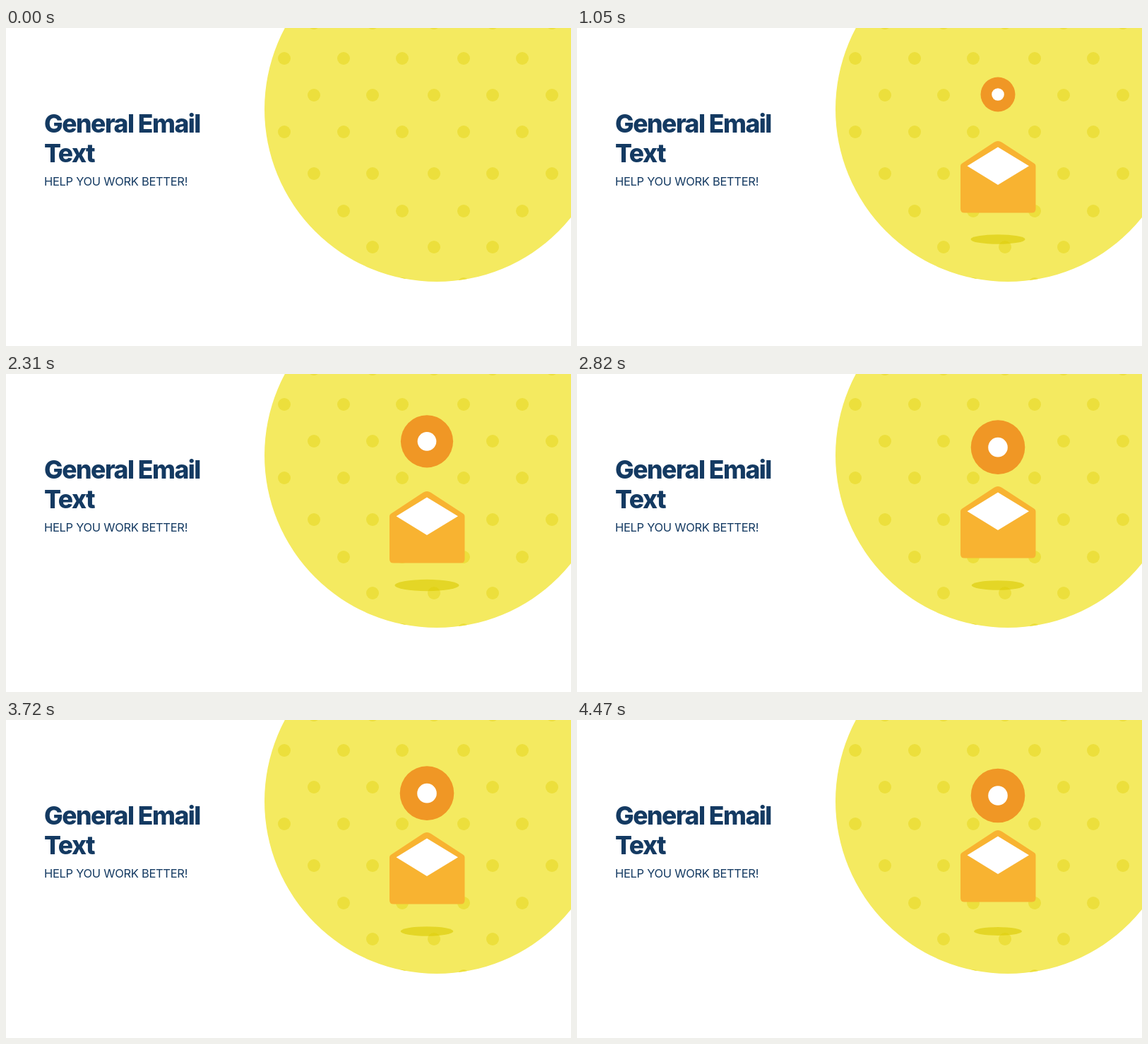
These frames come from a looping animation (800x450 px, 4500 ms). An HTML page:

```html
<!DOCTYPE html>
<html lang="en">
<head>
<meta charset="utf-8">
<title>General Email Text</title>
<style>
  html, body { margin: 0; width: 100%; height: 100%; overflow: hidden; background: #fff; }
  svg { display: block; width: 100%; height: 100%; }
  text { font-family: Inter, sans-serif; fill: #143a62; }
  .head { font-size: 35.5px; font-weight: 800; letter-spacing: -1.5px; }
  .sub { font-size: 16.5px; letter-spacing: -0.3px; }
</style>
</head>
<body>
<svg viewBox="0 0 800 450">
  <clipPath id="disc"><circle cx="610" cy="115" r="244"/></clipPath>
  <circle cx="610" cy="115" r="244" fill="#f4ea60"/>
  <g id="dots" clip-path="url(#disc)" fill="#ecdf3c"></g>

  <text class="head" x="54" y="147.5">General Email</text>
  <text class="head" x="54" y="190">Text</text>
  <text class="sub" x="54" y="223">HELP YOU WORK BETTER!</text>

  <ellipse id="shadow" cx="596" cy="299" fill="#daca00" fill-opacity="0.6"/>
  <g id="envelope">
    <path fill="#f8b331" d="M543 191.5 Q543 189 545 187.7 L590.5 157.7 Q596 154.300 601.500 157.700 L647.500 187.700 Q649.500 189 649.500 191.500 V252 Q649.500 257.500 644 257.500 H548.500 Q543 257.500 543 252 Z"/>
    <path fill="#fff" d="M596 164.500 L640 191.200 L596 218 L552.500 191.200 Z"/>
  </g>
  <g id="badge">
    <circle r="1" fill="#f09725"/>
    <circle r="0.36" fill="#fff"/>
  </g>
</svg>
<script>
const LOOP = 4500, STEP = 30, PERIOD = 900;
const LIFT_FROM = 870, BOB_FROM = 2220;
const $ = id => document.getElementById(id);
const clamp = x => Math.min(1, Math.max(0, x));
const smooth = x => x * x * (3 - 2 * x);

// Staggered pattern of dots inside the big disc
const rows = [-7, 43, 95, 147, 206, 259, 310, 362];
const even = [436, 519, 606, 689, 773], odd = [394, 478, 561, 648, 731];
$("dots").innerHTML = rows.map((y, i) =>
  (i % 2 ? odd : even).map(x => `<circle cx="${x}" cy="${y}" r="9"/>`).join("")
).join("").replace(/^/, "");

// Hover height: 1 at the top, 0 at the bottom of each cycle
function hover(t) {
  const x = ((t + 30) % PERIOD) / PERIOD * 2;
  return x < 1 ? 1 - smooth(x) : smooth(x - 1);
}

// Badge radius: steady growth, slight overshoot, settle
const grow = [[450, 0], [1080, 25.7], [1530, 40.5], [1620, 40.5], [2250, 37], [2640, 38.3], [LOOP, 38.3]];
function radius(t) {
  if (t <= grow[0][0]) return 0;
  const i = grow.findIndex(k => k[0] >= t);
  const [t0, r0] = grow[i - 1], [t1, r1] = grow[i];
  const x = (t - t0) / (t1 - t0);
  return r0 + (r1 - r0) * (i > 2 ? smooth(x) : x);
}

function draw(t) {
  const h = hover(t);
  const pop = 1 - (1 - clamp(t / 450)) ** 3;

  const rx = (47 - 13 * h) * pop;
  $("shadow").setAttribute("rx", rx);
  $("shadow").setAttribute("ry", rx * 0.178);

  const drop = t < LIFT_FROM ? 0.4 : 11.3 * (1 - h);
  $("envelope").setAttribute("transform",
    `translate(596 ${207 + drop}) scale(${pop}) translate(-596 -207)`);

  const y = 94 + (t < BOB_FROM ? 0 : 13 * h);
  $("badge").setAttribute("transform", `translate(596 ${y}) scale(${radius(t)})`);
}

const start = performance.now();
function tick() {
  const t = (performance.now() - start) % LOOP;
  draw(Math.floor(t / STEP) * STEP);
  requestAnimationFrame(tick);
}
draw(0);
requestAnimationFrame(tick);
</script>
</body>
</html>
```
